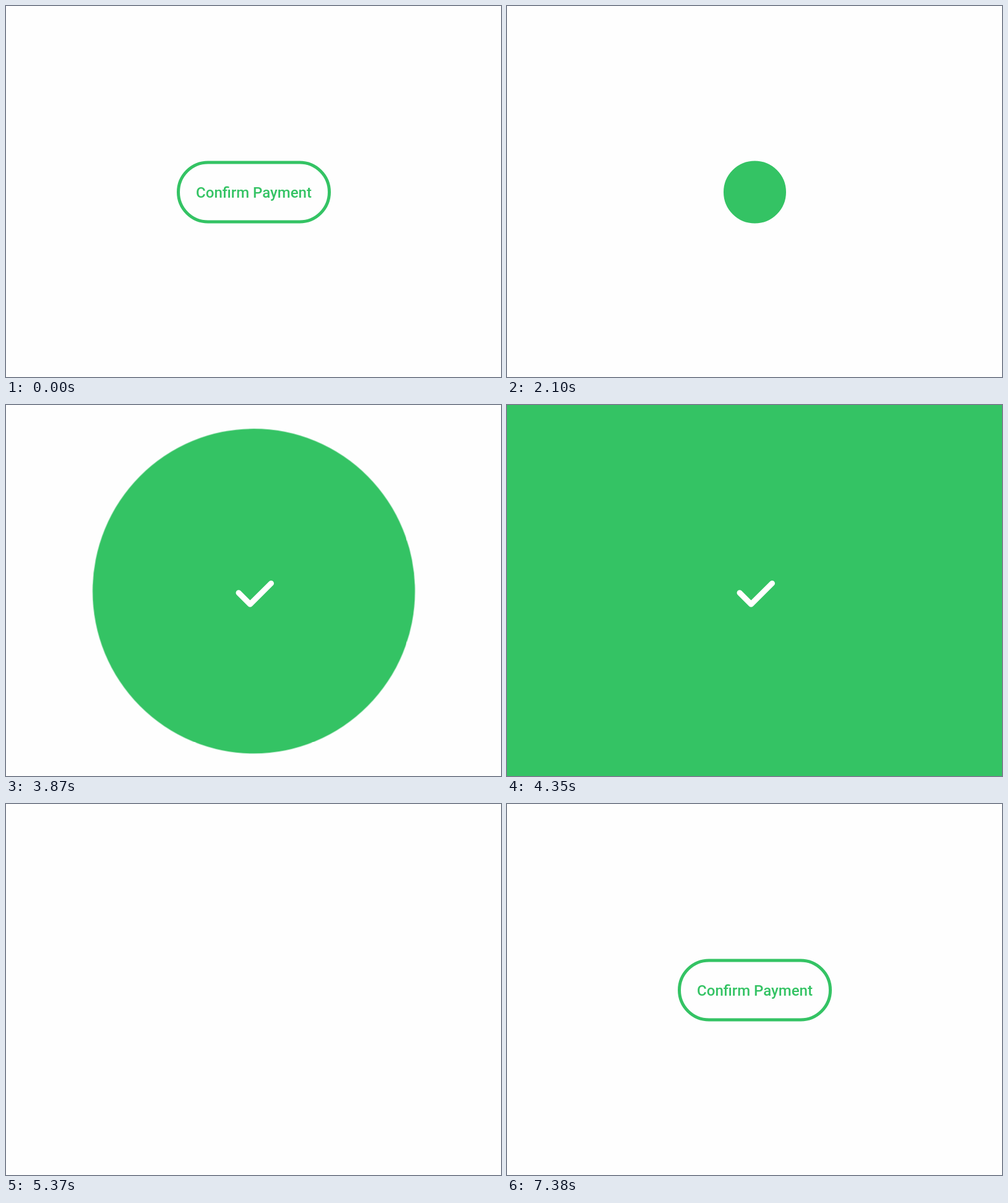
An HTML page that plays this animation: 800x600 px, repeating every 7410 ms.

```html
<!DOCTYPE html>
<html lang="en">
<head>
<meta charset="utf-8">
<title>Payment button</title>
<style>
  :root { --green: #34c364; }
  html, body { margin: 0; width: 100%; height: 100%; overflow: hidden; background: #fefefe; }
  svg { display: block; width: 800px; height: 600px; }

  .scene, .pill, .label, .burst, .check { animation: 7410ms linear infinite; }
  .scene { animation-name: scene; }
  .pill {
    x: 278.5px; width: 244px;
    fill: var(--green); stroke: var(--green); stroke-width: 5;
    animation-name: pill;
  }
  .label {
    font: 500 24px Roboto, sans-serif;
    text-anchor: middle; fill: var(--green);
    animation-name: label;
  }
  .burst { fill: var(--green); transform-origin: 400.5px 301px; animation-name: burst; }
  .check {
    fill: none; stroke: #fff; stroke-width: 9;
    stroke-linecap: round; stroke-linejoin: round;
    stroke-dasharray: 75 200;
    animation-name: check;
  }

  /* Easing is spelled out below: var() does not resolve for keyframe timing functions. */

  /* whole button: fade out after the burst, fade back in for the next round */
  @keyframes scene {
    0%, 67.314% { opacity: 1; animation-timing-function: cubic-bezier(.36, 0, .67, .29); }
    72.47%, 80.972% { opacity: 0; animation-timing-function: linear; }
    85.425%, 100% { opacity: 1; }
  }
  /* outline shrinks to a filled disc */
  @keyframes pill {
    0%, 19.433% {
      x: 278.5px; width: 244px; fill-opacity: 0;
      animation-timing-function: cubic-bezier(.333, .667, .667, 1);
    }
    28.34%, 74% { x: 352.5px; width: 96px; fill-opacity: 1; animation-timing-function: step-end; }
    74.01%, 100% { x: 278.5px; width: 244px; fill-opacity: 0; }
  }
  @keyframes label {
    0%, 19.433% { opacity: 1; }
    23.482%, 74% { opacity: 0; animation-timing-function: step-end; }
    74.01%, 100% { opacity: 1; }
  }
  /* disc grows over the stage, then collapses */
  @keyframes burst {
    0% { transform: scale(1); opacity: 0; animation-timing-function: step-end; }
    49.865% {
      transform: scale(1); opacity: 1;
      animation-timing-function: cubic-bezier(.333, .667, .667, 1);
    }
    58.704%, 67.314% {
      transform: scale(10); opacity: 1;
      animation-timing-function: cubic-bezier(.36, 0, .67, .29);
    }
    72.47% { transform: scale(1); opacity: 1; animation-timing-function: step-end; }
    74%, 100% { transform: scale(1); opacity: 0; }
  }
  @keyframes check {
    0% { stroke-dashoffset: 75; opacity: 0; animation-timing-function: step-end; }
    32.389% {
      stroke-dashoffset: 75; opacity: 1;
      animation-timing-function: cubic-bezier(.333, .667, .667, 1);
    }
    36.032%, 72.47% { stroke-dashoffset: 0; opacity: 1; animation-timing-function: step-end; }
    74%, 100% { stroke-dashoffset: 75; opacity: 0; }
  }
</style>
</head>
<body>
<svg viewBox="0 0 800 600">
  <g class="scene">
    <rect class="pill" y="253" height="96" rx="48"/>
    <text class="label" x="400.5" y="310">Confirm Payment</text>
    <ellipse class="burst" cx="400.5" cy="301" rx="50.2" ry="50.6"/>
    <path class="check" d="M376 303.7 394.5 322.2 428.5 288.4"/>
  </g>
</svg>
</body>
</html>
```
